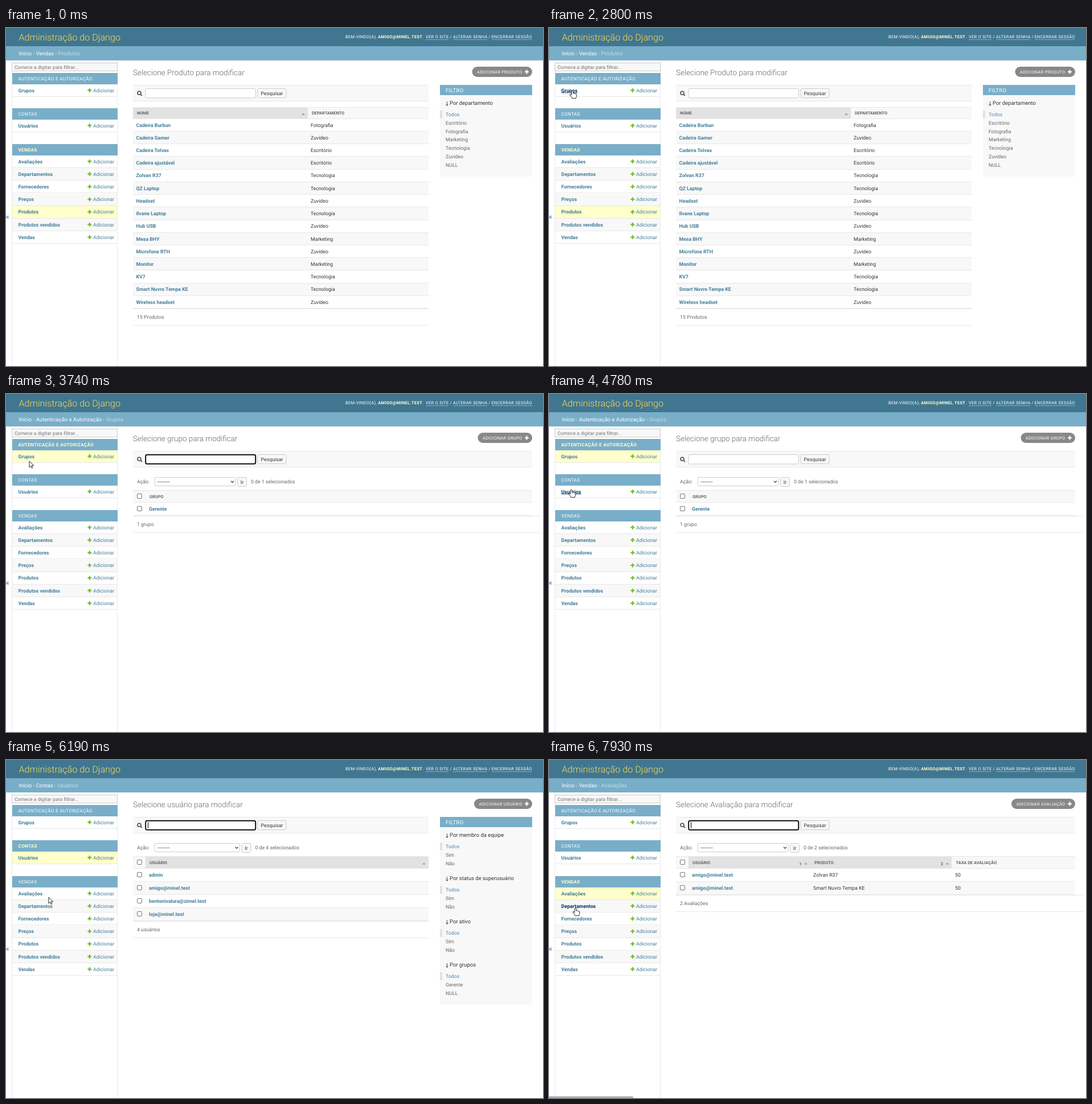
An HTML page for the animation above (8000 ms loop, 943 by 594 pixels).

```html
<!DOCTYPE html>
<html lang="pt-BR">
<head>
<meta charset="utf-8">
<title>Administração do Django</title>
<style>
  html, body { margin: 0; width: 100%; height: 100%; overflow: hidden; background: #fff; }
  svg { display: block; width: 943px; height: 594px; font-family: Roboto, sans-serif; }
  text { text-rendering: geometricPrecision; white-space: pre; }
  .crisp { shape-rendering: crispEdges; }
</style>
</head>
<body>
<svg viewBox="0 0 943 594">
  <g id="view"></g>
  <g id="cursor" stroke="#111" stroke-width=".9" stroke-linejoin="round" fill="#fff">
    <path id="arrow" d="M0 0V10.8L2.5 8.5 4.2 12.4 5.9 11.6 4.2 7.8H7.7Z"/>
    <path id="hand" d="M-1.4 1Q0-1 1.4 1V5Q2.6 4 3.6 5.2 5 4.6 5.6 5.9 7 5.4 7.3 7V9.5Q7.2 11.5 6 13.7H-.5Q-1.5 11-4.2 8-5 6.4-3.4 6.4-2.4 6.8-1.4 8Z"/>
  </g>
</svg>
<script>
const LOOP = 8000;
const ZOOM = 943 / 1400;
const LINK = '#447e9b', HOVER = '#003366', BLUE = '#79aec8', LINE = '#e8e8e8', PALE = '#f8f8f8';
const GREY = '#666', INK = '#333', CREAM = '#ffffcc';
const MAIL = 'amigo@minel.test';

// Basic shapes; text is centred vertically on cy by its capital height.
const rect = (x, y, w, h, fill) =>
  `<rect class="crisp" x="${x}" y="${y}" width="${w}" height="${h}" fill="${fill}"/>`;
const box = (x, y, w, h, fill, stroke, r = 2, sw = 1) =>
  `<rect x="${x}" y="${y}" width="${w}" height="${h}" rx="${r}" fill="${fill}" stroke="${stroke}" stroke-width="${sw}"/>`;
const text = (x, cy, s, fill = INK, size = 13, extra = '') => {
  const px = size * ZOOM;
  return `<text x="${x}" y="${(cy + px * 0.355).toFixed(2)}" font-size="${px.toFixed(2)}" fill="${fill}" ${extra}>${s}</text>`;
};
const BOLD = 'font-weight="700"';
const SPACED = 'letter-spacing=".337"';
const hline = (x, y, right) => rect(x, y, right - x, 1, LINE);
const path = (x, y, d, attrs) => `<path transform="translate(${x} ${y})" d="${d}" ${attrs}/>`;
const plus = (x, y, fill) => path(x, y, 'M-1.1-3.5H1.1V-1.1H3.5V1.1H1.1V3.5H-1.1V1.1H-3.5V-1.1H-1.1Z', `fill="${fill}"`);
const sortMark = (x, y) => path(x, y, 'M-3 1.3 0-1.7 3 1.3Z', 'fill="#999"');
const check = cy => box(230.5, cy - 4.5, 8, 8, '#fff', '#767676', 1.5);

const MENU = [
  { app: 'Autenticação e Autorização', y: 79, items: ['Grupos'] },
  { app: 'Contas', y: 141, items: ['Usuários'] },
  { app: 'Vendas', y: 204, items: ['Avaliações', 'Departamentos', 'Fornecedores', 'Preços', 'Produtos', 'Produtos vendidos', 'Vendas'] },
];
const ROW = 22.2;
const rowMid = (app, i) => app.y + 30.4 + i * ROW;

const YES_NO = ['Sim', 'Não'];
const PAGES = {
  products: {
    app: 'Vendas', item: 'Produtos', title: 'Produto', addX: 818.5, right: 742, total: '15 Produtos',
    head: 139, first: 159.8, step: 22.22,
    cols: [
      { x: 223, to: 530, label: 'Nome', lx: 230, tx: 228.5, mark: 522 },
      { x: 530, to: 742, label: 'Departamento', lx: 537, tx: 535 },
    ],
    rows: [
      ['Cadeira Burbun', 'Fotografia'], ['Cadeira Gamer', 'Zuvideo'], ['Cadeira Tolvas', 'Escritório'],
      ['Cadeira ajustável', 'Escritório'], ['Zolvan R37', 'Tecnologia'], ['QZ Laptop', 'Tecnologia'],
      ['Headset', 'Zuvideo'], ['Ilvane Laptop', 'Tecnologia'], ['Hub USB', 'Zuvideo'],
      ['Mesa BHY', 'Marketing'], ['Microfone RTH', 'Zuvideo'], ['Monitor', 'Marketing'],
      ['KV7', 'Tecnologia'], ['Smart Nuvro Tempa KE', 'Tecnologia'], ['Wireless headset', 'Zuvideo'],
    ],
    filters: [['departamento', 'Escritório', 'Fotografia', 'Marketing', 'Tecnologia', 'Zuvideo', 'NULL']], filterEnd: 261,
  },
  groups: {
    app: MENU[0].app, item: 'Grupos', title: 'grupo', addX: 828.5, right: 924, total: '1 grupo',
    head: 169, first: 191, step: 23, selectTo: 403,
    cols: [{ x: 245, to: 924, label: 'Grupo', lx: 252, tx: 251 }],
    rows: [['Gerente']],
  },
  users: {
    app: 'Contas', item: 'Usuários', title: 'usuário', addX: 822, right: 742, total: '4 usuários',
    head: 169, first: 191, step: 22.95, selectTo: 410.5,
    cols: [{ x: 245, to: 742, label: 'Usuário', lx: 252, tx: 251, mark: 734 }],
    rows: [['admin'], [MAIL], ['bentonivalura@zimel.test'], ['loja@minel.test']],
    filters: [['membro da equipe', ...YES_NO], ['status de superusuário', ...YES_NO], ['ativo', ...YES_NO], ['grupos', 'Gerente', 'NULL']],
    filterEnd: 430,
  },
  reviews: {
    app: 'Vendas', item: 'Avaliações', title: 'Avaliação', addX: 812, right: 924, total: '2 Avaliações',
    head: 169, first: 191, step: 23, selectTo: 420,
    cols: [
      { x: 245, to: 459, label: 'Usuário', lx: 252, tx: 251, mark: 451, order: 1 },
      { x: 459, to: 707, label: 'Produto', lx: 466, tx: 464, mark: 699.5, order: 2 },
      { x: 707, to: 924, label: 'Taxa de avaliação', lx: 714.5, tx: 713 },
    ],
    rows: [[MAIL, 'Zolvan R37', '50'], [MAIL, 'Smart Nuvro Tempa KE', '50']],
  },
};

function header(p) {
  let s = rect(0, 0, 943, 32, '#417690') + rect(0, 32, 943, 25, BLUE);
  s += text(22.5, 16, 'Administração do Django', '#f5dd5d', 24, 'font-weight="300"');
  const small = (x, str, extra = '') => text(x, 15.8, str, '#fff', 11, SPACED + extra);
  s += small(733.5, `BEM-VINDO(A), <tspan ${BOLD} fill="${CREAM}">${MAIL.toUpperCase()}</tspan>.`, ' text-anchor="end"');
  for (const [x, to, label] of [[737, 777, 'VER O SITE'], [785, 845, 'ALTERAR SENHA'], [852.5, 923.5, 'ENCERRAR SESSÃO']])
    s += small(x, label) + rect(x, 20, to - x, 1, 'rgba(255,255,255,.4)');
  s += small(779.5, '/') + small(847.5, '/');
  const link = str => `<tspan fill="#fff">${str}</tspan>`;
  return s + text(22.5, 44.5, `${link('Início')} › ${link(p.app)} › ${p.item}`, '#c4dce8', 14);
}

function sidebar(p, hover, underline) {
  let s = rect(10, 57, 1, 537, LINE) + rect(195, 57, 1, 537, LINE);
  s += text(-0.6, 331, '«', LINK, 20);
  s += box(10.5, 61.5, 185, 14, PALE, '#ccc', 0) + text(15, 68.5, 'Comece a digitar para filtrar...', '#707070', 12.8);
  for (const m of MENU) {
    const here = m.app === p.app;
    s += rect(11, m.y, 185, 20, BLUE);
    s += text(21.5, m.y + 9.7, m.app.toUpperCase(), here ? CREAM : '#fff', 12, SPACED + (here ? BOLD.padStart(20) : ''));
    m.items.forEach((name, i) => {
      const top = Math.round(m.y + 20 + i * ROW), mid = rowMid(m, i), over = name + m.app === hover;
      const fill = here && name === p.item ? CREAM : i % 2 ? PALE : '#fff';
      s += rect(11, top, 184, 22, fill) + hline(11, top + 21, 195);
      s += text(21.5, mid, name, over ? HOVER : LINK, 13, BOLD + (over && underline ? ' text-decoration="underline"' : ''));
      s += plus(146.8, mid, '#70bf2b') + text(153, mid, 'Adicionar', LINK);
    });
  }
  return s;
}

function button(x, y, w, label) {
  return box(x, y, w, 16, '#f8f8f8', '#ccc') + text(x + w / 2, y + 8, label, INK, 13, 'text-anchor="middle"');
}

function toolbar(p, focus, caret) {
  let s = text(223, 78.7, `Selecione ${p.title} para modificar`, GREY, 20, 'font-weight="300"');
  s += `<rect x="${p.addX}" y="68" width="${924 - p.addX}" height="18" rx="9" fill="#888"/>`;
  s += text(p.addX + 8.5, 77, `ADICIONAR ${p.title.toUpperCase()}`, '#fff', 11, SPACED) + plus(914.5, 77, '#fff');
  s += rect(223, 100, p.right - 223, 29, PALE) + hline(223, 100, p.right) + hline(223, 128, p.right);
  s += path(234, 114.2, 'M3 0A3 3 0 1 1-3 0 3 3 0 1 1 3 0M2.2 2.2 5 5', 'fill="none" stroke="#4a4a4a" stroke-width="1.6"');
  s += focus ? box(245.2, 106.8, 193, 16, '#fff', '#101010', 2.5, 2) : box(245, 106.5, 193.5, 16.5, '#fff', '#ccc', 2.5);
  if (caret) s += rect(249, 109, 1, 11, '#000');
  s += button(442, 106.5, 50, 'Pesquisar');
  if (p.selectTo) {
    const x = p.selectTo;
    s += text(230, 154, 'Ação:', GREY) + box(261, 146.5, x - 261, 15, '#fff', '#ccc');
    s += text(266, 154, '---------') + path(x - 5.5, 154.2, 'M-2.4-1.3 0 1.2 2.4-1.3', 'fill="none" stroke="#333" stroke-width="1.3"');
    s += button(x + 3.5, 146.5, 16, 'Ir') + text(x + 27, 154, `0 de ${p.rows.length} selecionados`, GREY);
  }
  return s;
}

function table(p) {
  const { head, first, step, right, rows } = p, top = Math.round(first), mid = head + (p.selectTo ? 11.3 : 10.5);
  let s = rect(223, head, right - 223, top - head, PALE);
  for (const c of p.cols) {
    if (c.mark) s += rect(c.x, head, c.to - c.x, top - head, '#e2e2e2') + sortMark(c.mark, mid + 2);
    if (c.order) s += text(c.mark - 11.5, mid + 2, c.order, GREY, 10.5, BOLD);
    s += text(c.lx, mid, c.label.toUpperCase(), GREY, 11, BOLD);
  }
  s += hline(223, head, right) + hline(223, top - 1, right);
  if (p.selectTo) s += check(mid - 0.3);
  rows.forEach((row, i) => {
    const y = Math.round(first + i * step), end = Math.round(first + (i + 1) * step), cy = first + i * step + (p.selectTo ? 11.1 : 10.7);
    s += rect(223, y, right - 223, end - y, i % 2 ? PALE : '#fff') + hline(223, end - 1, right);
    if (p.selectTo) s += check(cy - 0.1);
    row.forEach((cell, j) => s += text(p.cols[j].tx, cy, cell, j ? INK : LINK, 13, j ? '' : BOLD));
  });
  const end = Math.round(first + rows.length * step), to = p.filters ? right : 937;
  return s + hline(223, end, to) + text(230, end + 14.7, p.total, GREY) + hline(223, end + 29, to);
}

function filters(p) {
  if (!p.filters) return '';
  let s = rect(762, 100, 162, p.filterEnd - 100, PALE) + rect(762, 100, 162, 18, BLUE);
  s += text(772, 109.3, 'FILTRO', '#fff', 14, SPACED);
  p.filters.forEach(([name, ...options], i) => {
    const y = 132 + i * 76;
    s += path(774.5, y + 0.8, 'M0-3.5V3.5M-2 1.5 0 3.7 2 1.5', 'fill="none" stroke="#333" stroke-width=".9"');
    s += text(779, y, `Por ${name}`, INK, 14) + rect(762, y + 13, 4, 14, '#e2e2e2');
    ['Todos', ...options].forEach((o, j) => s += text(772, y + 19.9 + j * 14.8, o, j ? GREY : '#4c86b4'));
  });
  return s;
}

// Each move: start, end, then start, control and end points of its curve.
const MOVES = [
  [250, 670, 720, 545, 380, 330, 116, 305],
  [930, 1760, 116, 305, 172, 240, 83, 166],
  [1760, 2590, 83, 166, 60, 130, 41, 110],
  [3670, 4600, 41, 110, 41, 142, 39, 168],
  [5170, 5520, 39, 168, 55, 205, 78, 230],
  [6120, 6190, 78, 230, 77, 236, 75, 241],
  [6190, 6600, 75, 241, 70, 260, 56, 262],
  [6650, 7150, 56, 262, 50, 246, 45, 234],
  [7750, 7930, 45, 234, 45, 248, 46.5, 260],
];
function pointer(t) {
  let m = MOVES[0];
  for (const next of MOVES) if (t >= next[0]) m = next;
  const [t0, t1, x0, y0, cx, cy, x1, y1] = m;
  const k = Math.min(1, Math.max(0, (t - t0) / (t1 - t0)));
  const u = 1 - (1 - k) ** 1.7, v = 1 - u;
  return [v * v * x0 + 2 * u * v * cx + u * u * x1, v * v * y0 + 2 * u * v * cy + u * u * y1];
}

function linkAt(x, y) {
  for (const m of MENU)
    for (const [i, name] of m.items.entries())
      if (Math.abs(y - rowMid(m, i)) < 5.8 && x > 21 && x < 23 + name.length * 4.7) return name + m.app;
  return '';
}

// Page, load time, and when its search box loses focus.
const VISITS = [['products', 0, 0], ['groups', 2920, 4700], ['users', 4910, 7350], ['reviews', 7480, LOOP]];
const BUBBLES = [[2865, 2920], [7400, 7480], [7925, LOOP]];

const $ = id => document.getElementById(id);
let lastKey = '';
function draw() {
  const t = performance.now() % LOOP;
  const [page, loaded, blur] = VISITS.filter(v => t >= v[1]).pop();
  const [x, y] = pointer(t);
  const hover = t >= 320 ? linkAt(x, y) : '';
  const focus = t < blur;
  const caret = focus && Math.floor((t - loaded) / 500) % 2 === 0;
  const bubble = BUBBLES.some(([a, b]) => t >= a && t < b);
  const underline = t < 7800;
  const key = [page, hover, focus, caret, bubble, underline].join();
  if (key !== lastKey) {
    const p = PAGES[page];
    $('view').innerHTML = header(p) + sidebar(p, hover, underline) + toolbar(p, focus, caret) + table(p) + filters(p) +
      (bubble ? '<path d="M0 591H146Q148 591 148 593V594H0Z" fill="#b0b0b0"/>' : '');
    lastKey = key;
  }
  $('cursor').style.display = t < 320 ? 'none' : '';
  $('cursor').setAttribute('transform', `translate(${x.toFixed(2)} ${y.toFixed(2)})`);
  $('arrow').style.display = hover ? 'none' : '';
  $('hand').style.display = hover ? '' : 'none';
  requestAnimationFrame(draw);
}
draw();
</script>
</body>
</html>
```
